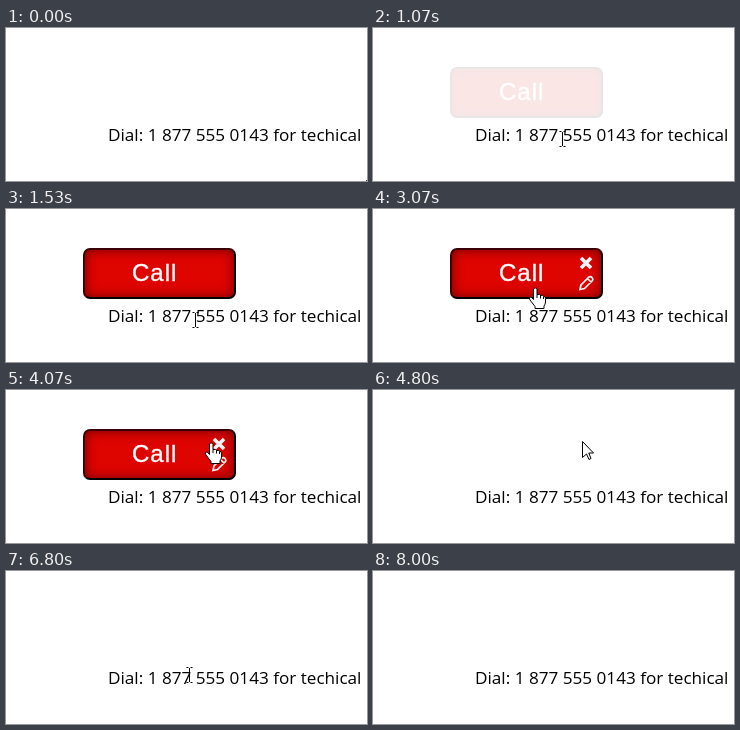
An HTML page for the animation above (8390 ms loop, 361 px wide and 153 px high).

```html
<!DOCTYPE html>
<html lang="en">
<head>
<meta charset="utf-8">
<title>Call button</title>
<style>
html, body { margin: 0; width: 100%; height: 100%; overflow: hidden; background: #fff; }
#button {
  position: absolute; left: 77px; top: 39px; width: 153px; height: 51px;
  box-sizing: border-box; border: 2px solid; border-color: #3c0000 #000 #000 #3c0000;
  border-radius: 7px; background: #de0400; box-shadow: inset 0 0 12px #700000;
}
svg { position: absolute; left: 0; top: 0; }
.label { font: 24px "Liberation Sans", Arial, sans-serif; letter-spacing: 1px; fill: #fff; stroke: #fff; stroke-width: .4; }
.phone { font: 17.14px "Open Sans", "Noto Sans", sans-serif; fill: #000; }
.shape { fill: #fff; stroke: #000; stroke-linejoin: round; }
.icon { fill: none; stroke: #f4f4f4; }
</style>
</head>
<body>
<div id="button"></div>
<svg width="361" height="153" viewBox="0 0 361 153">
  <text id="label" class="label" x="126" y="72">Call</text>
  <text class="phone" x="102" y="113">Dial: 1 877 555 0143 for techical</text>
  <g id="icons" class="icon">
    <path d="M208 49l10 10m0-10l-10 10" stroke-width="3.6"/>
    <path d="M207 80.5l1-4.5 8-8q1.5-1 3 .5t.5 3l-8 8zm7.500-11l4 4" stroke-width="1.7"/>
  </g>
  <g id="cursor">
    <path id="arrow" class="shape" d="M.5.5v16l4-3.500 2.500 5.500 2-1-2.200-5.500h4.700z"/>
    <path id="beam" fill="none" stroke="#000" d="M-2.500-7.500h2m2 0h2M.5-7v14m-3 .5h2m2 0h2"/>
    <path id="hand" class="shape" transform="translate(-7 -1)" d="M5.500 13.500V3a2 2 0 0 1 3.500 0v5.500q3-.8 3.500 1 2.500-.8 3 .8 2-.2 2 2V16q0 2-1.500 4v2.500H7v-2L2 14Q.5 11.500 2 11q1.500-.5 3.500 2.500zM9 8.500V12m3.500-2.500v3m3-2V13"/>
  </g>
</svg>
<script>
const LOOP = 8390, STEP = 200 / 3;
const el = id => document.getElementById(id);
const show = (id, on) => el(id).style.opacity = +on;
const swing = p => 0.5 - Math.cos(Math.PI * Math.min(1, Math.max(0, p))) / 2;

// Cursor moves: first step, last step, end x, end y
const moves = [
  [9, 15, 189, 111],
  [37, 46, 162, 78],
  [50, 56, 209, 47],
  [57, 61, 205, 52],
  [62, 66, 209, 51],
  [77, 86, 174, 107],
  [91, 96, 229, 104],
  [98, 103, 178, 104],
  [109, 120, 92, 154]
];

function cursorAt(n) {
  let [x, y] = n < 2 ? [360, 152] : [238, 154];
  for (const [from, to, endX, endY] of moves) {
    const k = swing((n - from) / (to - from));
    x += (endX - x) * k;
    y += (endY - y) * k;
  }
  return [Math.round(x), Math.round(y)];
}

function draw(now) {
  const n = Math.floor((now % LOOP + 3.4) / STEP);
  const [x, y] = cursorAt(n);
  const fade = n < 72 ? swing((n - 14.25) / 8.75) : 0;
  const hover = n > 37 && n < 72 && y < 90;
  const overText = y > 94 && y < 119;

  show("button", fade);
  show("label", fade > 0);
  show("icons", hover);
  show("hand", hover);
  show("beam", overText);
  show("arrow", !hover && !overText);
  el("cursor").setAttribute("transform", `translate(${x} ${y})`);
}

const start = performance.now();
function tick() {
  draw(performance.now() - start);
  requestAnimationFrame(tick);
}
tick();
</script>
</body>
</html>
```
